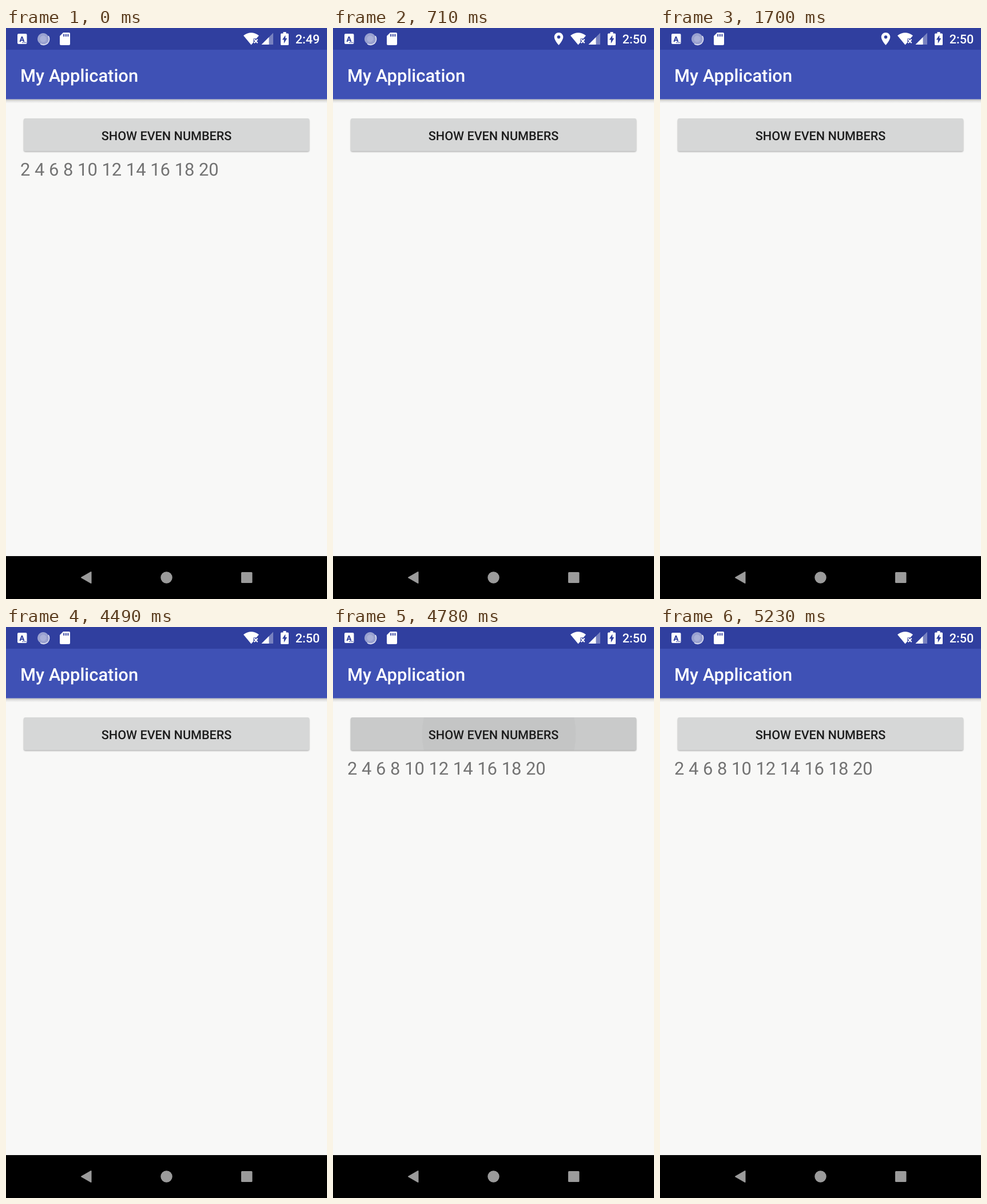
An HTML page for the animation above (7130 ms loop, 561 by 998 pixels).

```html
<!DOCTYPE html>
<html lang="en">
<head>
<meta charset="utf-8">
<title>Even numbers</title>
<style>
  html, body { margin: 0; width: 100%; height: 100%; overflow: hidden; background: #f8f8f7; }
  svg { display: block; width: 100%; height: 100%; }
  text { font-family: Roboto, sans-serif; white-space: pre; text-rendering: geometricPrecision; }
  .medium { font-weight: 500; }
</style>
</head>
<body>
<svg viewBox="0 0 561 998">
  <defs>
    <linearGradient id="barShadow" x2="0" y2="1">
      <stop offset="0" stop-opacity=".26"/>
      <stop offset=".4" stop-opacity=".1"/>
      <stop offset="1" stop-opacity="0"/>
    </linearGradient>
    <filter id="soft" x="-5%" y="-20%" width="110%" height="140%">
      <feGaussianBlur stdDeviation="1.3"/>
    </filter>
    <clipPath id="buttonClip"><rect x="31" y="158" width="499" height="57.5" rx="3"/></clipPath>
  </defs>

  <rect width="561" height="998" fill="#f8f8f7"/>
  <rect y="124.5" width="561" height="7" fill="url(#barShadow)"/>
  <rect y="37" width="561" height="87.5" fill="#3f51b5"/>
  <rect width="561" height="38" fill="#303f9f"/>
  <text class="medium" x="25" y="93.5" font-size="30.9" fill="#fff">My Application</text>

  <!-- Status bar -->
  <g fill="#fff">
    <rect x="20" y="10" width="16.5" height="18" rx="2"/>
    <text x="28" y="23.5" font-size="13" font-weight="900" text-anchor="middle" fill="#303f9f">A</text>
    <path d="M28.5 25.5h1.6m1 0h1.6m1 0h1.6" stroke="#303f9f" stroke-width="1.6"/>

    <circle cx="65" cy="19" r="10" fill="#a9b0d8"/>
    <circle cx="65" cy="19" r="7.5" fill="none" stroke="#8790c6" stroke-width="4" stroke-dasharray="1.1 1.25"/>
    <path d="M74 14A10 10 0 0 1 60 27.7" fill="none" stroke="#e8eaf6" stroke-width="1.6"/>

    <path d="M100 8h10q2 0 2 2v18q0 2-2 2H96q-2 0-2-2V14Z"/>
    <path d="M101.2 10.5v4.5m3.6-4.5v4.5m3.6-4.5v4.5" stroke="#303f9f" stroke-width="1.9"/>

    <path id="pin" fill-rule="evenodd" d="M394.5 8c-4.4 0-7.8 3.4-7.8 7.8 0 5.6 7.8 14.2 7.8 14.2s7.8-8.6 7.8-14.2c0-4.4-3.4-7.8-7.8-7.8Zm0 5a2.8 2.8 0 1 1 0 5.6 2.8 2.8 0 0 1 0-5.6Z"/>

    <path d="M415 13.2Q428.500 3.200 442 13.200L437.500 18.500H432.500V25L428.500 29.500Z"/>
    <path d="M433.700 19.800l6 6.400m0-6.400l-6 6.400" stroke="#fff" stroke-width="2"/>

    <path d="M446.500 29L467 8.500V29Z" opacity=".35"/>
    <path d="M446.500 29L459.500 16V29Z"/>

    <path d="M484.500 7h5v2.500h3q1.500 0 1.500 1.500v17.500q0 1.500-1.500 1.500h-11q-1.500 0-1.500-1.500V11q0-1.500 1.500-1.500h3Z"/>
    <path d="M488.300 12.500V18h3L485.800 27v-6.500h-3Z" fill="#303f9f"/>
    <text id="clock" class="medium" x="548.3" y="27" font-size="21.6" text-anchor="end">2:49</text>
  </g>

  <!-- Button -->
  <rect id="shadow" x="31" y="159.5" width="499" height="57" rx="3" opacity=".3" filter="url(#soft)"/>
  <g clip-path="url(#buttonClip)">
    <rect x="31" y="158" width="499" height="57.5" fill="#d6d7d7"/>
    <rect id="wash" x="31" y="158" width="499" height="57.5" opacity="0"/>
    <circle id="ripple" cx="290" cy="187" r="0" opacity="0"/>
  </g>
  <text class="medium" x="280.5" y="195.7" font-size="21.6" text-anchor="middle" fill="#1c1c1c">SHOW EVEN NUMBERS</text>
  <text id="numbers" x="25" y="258" font-size="30.9" fill="#737373"></text>

  <!-- Navigation bar -->
  <rect y="923" width="561" height="75" fill="#000"/>
  <g fill="#9b9b9b" stroke="#9b9b9b" stroke-linejoin="round">
    <path d="M132 960.5L148.500 951v19Z" stroke-width="2"/>
    <circle cx="280.5" cy="960.5" r="10.2" stroke="none"/>
    <rect x="411" y="951" width="19.5" height="19" rx="1.5" stroke="none"/>
  </g>
</svg>
<script>
  const LOOP = 7130, RESTART = 60, PIN_OFF = 4490, CLICK = 4700;
  const tracks = {
    wash: [[4530, 0], [4610, .06], [4800, .06], [5200, 0]],
    rippleOpacity: [[4530, 0], [4610, .022], [4820, .022], [5200, 0]],
    rippleRadius: [[4530, 20], [4780, 134], [4980, 212], [5200, 262]],
    shadow: [[4530, .3], [4640, .36], [4850, .36], [5050, .3]]
  };
  const $ = id => document.getElementById(id);
  const pin = $('pin'), clock = $('clock'), numbers = $('numbers');
  const wash = $('wash'), ripple = $('ripple'), shadow = $('shadow');

  numbers.textContent = Array.from({ length: 10 }, (_, i) => 2 * (i + 1)).join(' ');

  function valueAt(track, t) {
    const next = track.findIndex(([time]) => time > t);
    if (next === 0) return track[0][1];
    if (next < 0) return track[track.length - 1][1];
    const [t0, v0] = track[next - 1], [t1, v1] = track[next];
    return v0 + (v1 - v0) * (t - t0) / (t1 - t0);
  }

  const show = (el, on) => el.setAttribute('visibility', on ? 'visible' : 'hidden');

  function draw(t) {
    clock.textContent = t < RESTART ? '2:49' : '2:50';
    show(pin, t >= RESTART && t < PIN_OFF);
    show(numbers, t < RESTART || t >= CLICK);
    wash.setAttribute('opacity', valueAt(tracks.wash, t));
    ripple.setAttribute('opacity', valueAt(tracks.rippleOpacity, t));
    ripple.setAttribute('r', valueAt(tracks.rippleRadius, t));
    shadow.setAttribute('opacity', valueAt(tracks.shadow, t));
  }

  const start = performance.now();
  function tick() {
    draw((performance.now() - start) % LOOP);
    requestAnimationFrame(tick);
  }
  tick();
</script>
</body>
</html>
```
